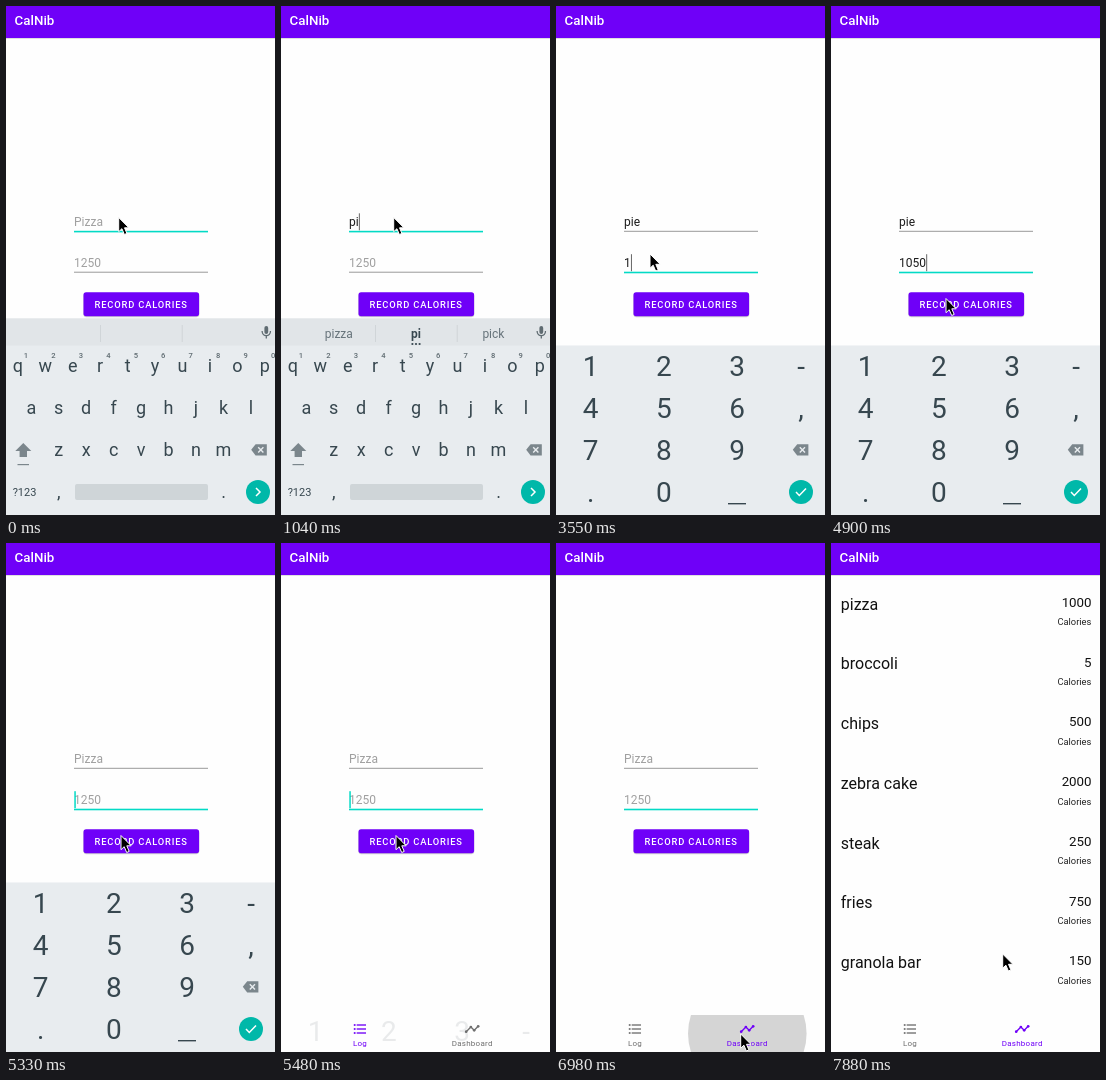
An HTML page for the animation above (8 s loop, 269 px wide and 509 px high).

```html
<!DOCTYPE html>
<html lang="en">
<head>
<meta charset="utf-8">
<title>Calorie log</title>
<style>
html, body { margin: 0; width: 100%; height: 100%; overflow: hidden; background: #fefefe; }
svg { display: block; width: 269px; height: 509px; font-family: Roboto, "Noto Sans", sans-serif; }
</style>
</head>
<body>
<svg id="stage" viewBox="0 0 269 509"></svg>
<script>
const LOOP = 8000;
const PURPLE = '#6f00f8', TEAL = '#03dac5', ACCENT = '#00b8a9';
const KEY = '#37474f', ICON = '#7b868c', BOARD = '#e8ecef', GREY = '#6f6f6f';
const stage = document.getElementById('stage');

function add(parent, tag, attrs = {}, text) {
  const node = document.createElementNS('http://www.w3.org/2000/svg', tag);
  set(node, attrs);
  if (text !== undefined) node.textContent = text;
  parent.appendChild(node);
  return node;
}
function set(node, attrs) {
  for (const name in attrs) node.setAttribute(name, attrs[name]);
}
const group = (parent, attrs) => add(parent, 'g', attrs);
const rect = (parent, x, y, width, height, fill, more) =>
  add(parent, 'rect', { x, y, width, height, fill, ...more });
const label = (parent, text, x, y, size, fill, more) =>
  add(parent, 'text', { x, y, 'font-size': size, fill, ...more }, text);
const centred = (parent, text, x, y, size, fill, more) =>
  label(parent, text, x, y, size, fill, { 'text-anchor': 'middle', ...more });
const show = (node, on) => node.setAttribute('visibility', on ? 'inherit' : 'hidden');

function clip(id) {
  return add(add(stage, 'defs'), 'clipPath', { id });
}
rect(clip('navArea'), 0, 472, 269, 37);
rect(clip('listArea'), 0, 32, 269, 440.5);

rect(stage, 0, 0, 269, 509, '#fefefe');

// Log form
const form = group(stage);
function makeField(y, hint) {
  const text = label(form, hint, 68, y, 12, '#a0a0a0');
  const line = rect(form, 68, y + 4.5, 134, 1, '#9a9a9a');
  const caret = rect(form, 68.3, y - 13, 1.5, 17, TEAL);
  return { y, hint, text, line, caret };
}
function updateField(field, value, focused, caretOn) {
  const { y, hint, text, line, caret } = field;
  text.textContent = value || hint;
  text.setAttribute('fill', value ? '#1c1c1c' : '#a0a0a0');
  set(line, { fill: focused ? TEAL : '#9a9a9a', height: focused ? 1.6 : 1, y: y + 4.5 });
  set(caret, value
    ? { x: 68.2 + text.getComputedTextLength(), width: 1, fill: '#666' }
    : { x: 68.3, width: 1.5, fill: TEAL });
  show(caret, focused && caretOn);
}
const foodField = makeField(220.3, 'Pizza');
const calorieField = makeField(261.2, '1250');

rect(form, 77.3, 287.2, 116, 24, '#000', { rx: 3, opacity: .18 });
rect(form, 77.5, 286.2, 115.6, 24, PURPLE, { rx: 2.6 });
const buttonGlow = rect(form, 77.5, 286.2, 115.6, 24, '#fff', { rx: 2.6 });
label(form, 'RECORD CALORIES', 88.6, 301.7, 9.33, '#fff', { 'font-weight': 500, 'letter-spacing': .83 });

// Dashboard list
const list = group(stage, { 'clip-path': 'url(#listArea)' });
[['pizza', 1000], ['broccoli', 5], ['chips', 500], ['zebra cake', 2000],
 ['steak', 250], ['fries', 750], ['granola bar', 150], ['', 35]].forEach(([food, calories], i) => {
  const y = i * 59.7;
  const right = { 'text-anchor': 'end' };
  label(list, food, 9.8, y + 66.7, 16, '#111');
  label(list, calories, 260.6, y + 64, 13.33, '#111', right);
  label(list, 'Calories', 260.4, y + 82.4, 9.33, '#222', right);
});

// Bottom navigation
const nav = group(stage, { 'clip-path': 'url(#navArea)' });
rect(nav, 0, 472, 269, 37, '#fefefe');
const ripple = add(nav, 'circle', { cx: 191.3, cy: 490.5, fill: '#000' });
function navItem(text, x) {
  const item = group(nav);
  centred(item, text, x, 503.2, 8, 'currentColor', { 'letter-spacing': .27 });
  return { item, icon: group(item, { transform: `translate(${x - 8} 478) scale(.667)` }) };
}
const logTab = navItem('Log', 79);
for (const y of [6, 12, 18]) {
  rect(logTab.icon, 2.7, y - 1.3, 2.6, 2.6, 'currentColor');
  rect(logTab.icon, 7, y - 1, 14, 2, 'currentColor');
}
const dashTab = navItem('Dashboard', 191.2);
const trend = [[3, 16], [10, 9], [15, 14], [21, 8]];
add(dashTab.icon, 'polyline', { points: trend.join(' '), fill: 'none', stroke: 'currentColor', 'stroke-width': 2 });
for (const [cx, cy] of trend) add(dashTab.icon, 'circle', { cx, cy, r: 2, fill: 'currentColor' });

// Keyboards
function backspace(parent, x, y) {
  const icon = group(parent, { transform: `translate(${x} ${y})` });
  add(icon, 'path', { d: 'M-8 0L-3.6-5.6H7.6V5.6H-3.6Z', fill: ICON });
  add(icon, 'path', { d: 'M-1-2.6L4.2 2.6M4.2-2.6L-1 2.6', stroke: BOARD, 'stroke-width': 1.4 });
}
function actionKey(parent, x, path) {
  add(parent, 'circle', { cx: x, cy: 486, r: 12, fill: ACCENT });
  add(parent, 'path', { d: path, transform: `translate(${x} 486)`, fill: 'none', stroke: '#fff', 'stroke-width': 1.5 });
}

const letters = group(stage);
rect(letters, 0, 312.5, 269, 197, BOARD);
rect(letters, 0, 312.5, 269, 27, '#e1e5e8');
for (const x of [94, 175.7]) rect(letters, x, 319, 1, 17, '#d0d5d8');
const mic = group(letters, { transform: 'translate(260.3 326)', stroke: '#5f6b71', fill: 'none', 'stroke-width': 1.3 });
rect(mic, -1.9, -6, 3.8, 8, '#5f6b71', { rx: 1.9, stroke: 'none' });
add(mic, 'path', { d: 'M-4.2-1C-4.2 5.2 4.2 5.2 4.2-1M0 3.5V6.6' });

const suggestions = [57.8, 135, 212.4].map((x, i) =>
  centred(letters, '', x, 331.6, 12, i === 1 ? KEY : '#66737a', { 'font-weight': i === 1 ? 700 : 400 }));
const moreDots = group(letters);
for (const x of [131.4, 135, 138.6]) add(moreDots, 'circle', { cx: x, cy: 338, r: 1.1, fill: KEY });

function keyRow(keys, x, y) {
  [...keys].forEach((key, i) => centred(letters, key, x + i * 27.45, y, 18, KEY));
}
keyRow('qwertyuiop', 11.8, 366.3);
keyRow('asdfghjkl', 25.3, 408.3);
keyRow('zxcvbnm', 52.8, 450.3);
[...'1234567890'].forEach((digit, i) =>
  centred(letters, digit, 20 + i * 27.45, 351.6, 7.6, '#5f6b71', { 'font-weight': 500 }));
add(letters, 'path', { d: 'M17.3 437L25.3 445H21V451H13.6V445H9.3Z', fill: ICON });
rect(letters, 11.5, 458, 11.5, 1.2, ICON);
backspace(letters, 253.2, 443.8);
centred(letters, '?123', 18.5, 490, 11, KEY);
centred(letters, ',', 52.8, 492, 18, KEY);
rect(letters, 69, 478, 133, 16, '#cfd5d8', { rx: 2 });
centred(letters, '.', 217.5, 492, 18, KEY);
actionKey(letters, 252, 'M-2-4L2 0L-2 4');

const digits = group(stage);
const digitsBack = rect(digits, 0, 339.5, 269, 170, BOARD);
['123-', '456,', '789', '.0'].forEach((row, r) => [...row].forEach((key, c) =>
  centred(digits, key, [34.6, 107.8, 181, 245][c], 370 + r * 42, 28, KEY)));
rect(digits, 172, 497, 18, 1.4, KEY);
backspace(digits, 244.8, 443.8);
actionKey(digits, 245, 'M-5 0L-1.7 3.4L5-3.6');

// App bar and pointer
rect(stage, 0, 32, 269, 1, '#000', { opacity: .12 });
rect(stage, 0, 0, 269, 32, PURPLE);
label(stage, 'CalNib', 8.6, 18.8, 13.33, '#fff', { 'font-weight': 500 });
const pointer = add(stage, 'path', {
  d: 'M0 0V14.2L3.2 11.2L5.7 17L8.2 15.9L5.8 10.3H10.2Z',
  fill: '#000', stroke: '#fff', 'stroke-width': 1, 'stroke-linejoin': 'round',
});

// Step tracks: [start time, value]
const typedFood = [[0, ''], [590, 'p'], [890, 'pi'], [1330, 'pie'], [5330, '']];
const typedCalories = [[0, ''], [3550, '1'], [3700, '105'], [3850, '1050'], [5330, '']];
const offered = [[0, ''], [740, 'o p up'], [1040, 'pizza pi pick'], [1480, 'lie pie piece']];
const caretOn = [[0, false], [300, true], [2360, false], [3550, true], [4450, false],
  [4900, true], [5930, false], [6230, true], [6530, false]];
const glow = [[0, 0], [5040, .14], [5190, .26], [5330, 0]];
const rippleState = [[0, [0, 0]], [6830, [32, .1]], [6980, [59.3, .16]], [7280, [59.3, .06]], [7430, [0, 0]]];
const at = (track, t) => track.filter(([start]) => start <= t).pop()[1];

// Moves: first step, last step, step count, destination
const START = [112.7, 211.5];
const moves = [
  [1630, 2070, 4, [94, 248]],
  [4300, 4900, 5, [115, 292.5]],
  [5630, 6230, 5, [184.7, 491]],
  [7280, 7880, 5, [171.7, 411]],
];
function pointerAt(t) {
  let from = START;
  for (const [first, last, count, to] of moves) {
    if (t < first) break;
    const step = Math.floor((t - first) / (last - first) * (count - 1) + 1e-6) + 1;
    const p = Math.min(1, step / count);
    const eased = p * p * (3 - 2 * p);
    from = from.map((v, i) => v + (to[i] - v) * eased);
  }
  return from;
}

function draw(t) {
  const onList = t >= 7280;
  const onCalories = t >= 2070;
  show(form, !onList);
  show(list, onList);
  updateField(foodField, at(typedFood, t), !onCalories, !onList && at(caretOn, t));
  updateField(calorieField, at(typedCalories, t), onCalories, !onList && at(caretOn, t));
  buttonGlow.setAttribute('opacity', at(glow, t));

  const words = at(offered, t).split(' ');
  suggestions.forEach((node, i) => { node.textContent = words[i] || ''; });
  show(moreDots, words.length > 1);
  show(letters, t < 2360);

  const leaving = t >= 5480;
  show(digits, t >= 2360 && t < 5630);
  show(digitsBack, t >= 2360 && !leaving);
  set(digits, { transform: `translate(0 ${leaving ? 128 : 0})`, opacity: leaving ? .1 : 1 });

  const dashSelected = t >= 6980;
  logTab.item.setAttribute('color', dashSelected ? GREY : PURPLE);
  dashTab.item.setAttribute('color', dashSelected ? PURPLE : GREY);
  const [r, opacity] = at(rippleState, t);
  set(ripple, { r, opacity });

  pointer.setAttribute('transform', `translate(${pointerAt(t)})`);
}

const began = performance.now();
function tick() {
  draw((performance.now() - began) % LOOP);
  requestAnimationFrame(tick);
}
tick();
</script>
</body>
</html>
```
